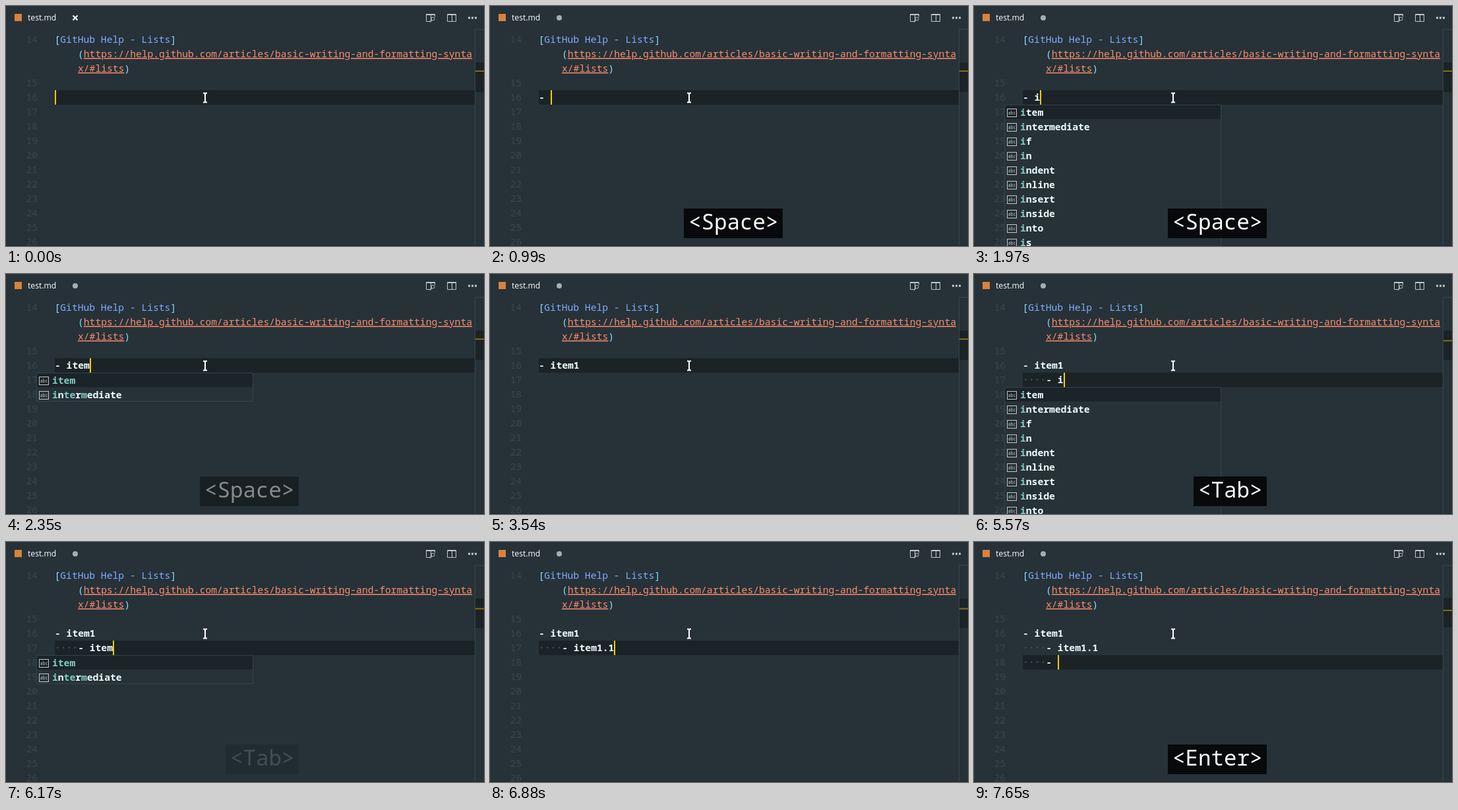
These frames come from a looping animation (725x365 px, 8000 ms). An HTML page:

```html
<!DOCTYPE html>
<html lang="en">
<head>
<meta charset="utf-8">
<title>Markdown list editing</title>
<style>
  html, body { margin: 0; width: 100%; height: 100%; overflow: hidden; background: #263238; }
  svg { display: block; }
  text { font: 500 14.667px "Noto Sans Mono", monospace; white-space: pre; fill: #eff; }
  .tab { font: 500 12.2px "Open Sans", sans-serif; fill: #fff; }
  .num { fill: #37474f; text-anchor: end; }
  .code { font-weight: 600; }
  .dim { fill: #3c4d55; }
  .mark { fill: #89ddff; }
  .name { fill: #82aaff; }
  .url { fill: #ff8b6c; text-decoration: underline; }
  .hit { fill: #80cbc4; font-weight: 700; }
  .abc { font-size: 6.5px; fill: #c5c5c5; }
  .key { font-size: 32.5px; font-weight: 300; fill: #fff; text-anchor: end; }
  .icon { fill: none; stroke: #c5c5c5; }
</style>
</head>
<body>
<svg width="725" height="365" viewBox="0 0 725 365">
  <g id="back"></g>
  <rect x="13" y="12" width="11" height="11" fill="#d9823b"/>
  <text class="tab" x="33" y="22">test.md</text>
  <g class="icon">
    <path d="M637.5 12.5h13v4M637.5 12v11.5h7M637 13.5h14M644.5 13v10"/>
    <circle cx="647.5" cy="19.5" r="2.5"/>
    <path d="M645.5 21.5l-2.5 3" stroke-width="1.5"/>
    <path d="M669.5 12.5h13v11h-13zM669 13.5h14M676.5 13v11"/>
  </g>
  <path d="M701 16.5h3v3h-3zM706 16.5h3v3h-3zM711 16.5h3v3h-3z" fill="#c5c5c5"/>
  <path d="M711.5 365V35.500H725" fill="none" stroke="#3b474c"/>
  <path d="M0 364.5H725" stroke="#1c262a"/>
  <text x="73.5" y="56"><tspan class="mark">[</tspan><tspan class="name">GitHub Help - Lists</tspan><tspan class="mark">]</tspan></text>
  <text x="109" y="78"><tspan class="mark">(</tspan><tspan class="url">https://help.github.com/articles/basic-writing-and-formatting-synta</tspan></text>
  <text x="109" y="100"><tspan class="url">x/#lists</tspan><tspan class="mark">)</tspan></text>
  <g id="front"></g>
</svg>
<script>
const LOOP = 8000, CELL = 8.8, LEFT = 74, ROW = 22;
const back = document.getElementById('back'), front = document.getElementById('front');

// time, line, text of that line after the keystroke
const edits = [
  [-40, 16, ''], [850, 16, '-'], [990, 16, '- '],
  [1920, 16, '- i'], [2170, 16, '- it'], [2220, 16, '- ite'], [2320, 16, '- item'], [3050, 16, '- item1'],
  [3650, 17, '- '], [4780, 17, '    - '],
  [5480, 17, '    - i'], [5620, 17, '    - it'], [5720, 17, '    - ite'], [5830, 17, '    - item'],
  [6500, 17, '    - item1'], [6730, 17, '    - item1.'], [6880, 17, '    - item1.1'],
  [7650, 18, '    - ']
];
// start, time fully faded, label; a new key replaces the one before
const keys = [[990, 2480, 'Space'], [3690, 5180, 'Enter'], [4800, 6210, 'Tab'], [7650, 9140, 'Enter']];
const FADE = 300;
const popups = [[1960, 3080], [5520, 6530]];
const words = 'item intermediate if in indent inline insert inside into is it its'.split(' ');

const rowTop = line => 128 + (line - 16) * ROW;
const rect = (x, y, w, h, fill, more = '') =>
  `<rect x="${x}" y="${y}" width="${w}" height="${h}" fill="${fill}" ${more}/>`;
const text = (x, y, s, cls) => `<text class="${cls}" x="${x}" y="${y}">${s}</text>`;

// Line 14 wraps over three rows
const numbers = Array.from({ length: 13 }, (_, i) =>
  text(48, i ? rowTop(14 + i) + 16 : 56, 14 + i, 'num')).join('');

// Marks the letters of query in word, or returns '' if they do not all occur in order
function match(word, query) {
  let i = 0;
  const out = [...word].map(c =>
    c === query[i] ? (i++, `<tspan class="hit">${c}</tspan>`) : c).join('');
  return i === query.length ? out : '';
}

function codeLine(line, s) {
  const dots = s.match(/^ */)[0].replace(/ /g, '·');
  return text(LEFT, rowTop(line) + 16, `<tspan class="dim">${dots}</tspan>${s.trimStart()}`, 'code');
}

function popup(line, query) {
  const y = rowTop(line) + ROW + 1;
  const rows = words.map(w => match(w, query)).filter(Boolean);
  return rect(46.5, y - .5, 328, rows.length * ROW - 1, '#263238', 'stroke="#34444b"') +
    rect(47, y, 327, ROW - 1, '#1b2428') +
    rows.map((s, i) => {
      const r = y + i * ROW;
      return rect(50.5, r + 5.5, 14, 12, 'none', 'class="icon"') +
        text(51.7, r + 14, 'abc', 'abc') + text(70, r + 16, s, 'code');
    }).join('');
}

function keyBox(label, opacity) {
  const w = (label.length + 2) * 19.5 + 13.5;
  return `<g opacity="${opacity}">${rect(444 - w, 308, w, 45, '#000', 'fill-opacity=".82"')}` +
    text(437.5, 340, `&lt;${label}&gt;`, 'key') + '</g>';
}

function draw(t) {
  const done = edits.filter(e => e[0] <= t);
  const [since, line, current] = done[done.length - 1];
  const lines = new Map(done.map(e => [e[1], e[2]]));
  const shift = line - 16, y = rowTop(line);

  back.innerHTML = rect(LEFT, y, 637, ROW, '#1b2327') +
    rect(712, shift > 1 ? 85 : 86, 13, 45, '#1b2327') +
    rect(712, 98 + shift * 2.5, 13, 2, '#84700f') + numbers;

  let out = t < 850
    ? '<path d="M101.5 14.5l7 7m0-7l-7 7" stroke="#fff" stroke-width="2"/>'
    : '<circle cx="105" cy="18" r="4" fill="#a9adaf"/>';
  for (const [n, s] of lines) out += codeLine(n, s);
  if ((t - since) % 1000 < 490)
    out += rect(Math.round(LEFT + current.length * CELL), y, 2, ROW, '#ffcc00');
  if (popups.some(([a, b]) => t >= a && t < b))
    out += popup(line, current.match(/[a-z]+/)[0]);
  out += '<path d="M299 132.5h2l1 1 1-1h2M302 133v12M299 146.500h2l1-1 1 1h2" fill="none" stroke="#fff" stroke-width="2"/>';
  const key = keys.filter(k => k[0] <= t).pop();
  if (key && t < key[1]) out += keyBox(key[2], Math.min(1, (key[1] - t) / FADE));
  front.innerHTML = out;
}

function tick() {
  draw(performance.now() % LOOP);
  requestAnimationFrame(tick);
}
tick();
</script>
</body>
</html>
```
